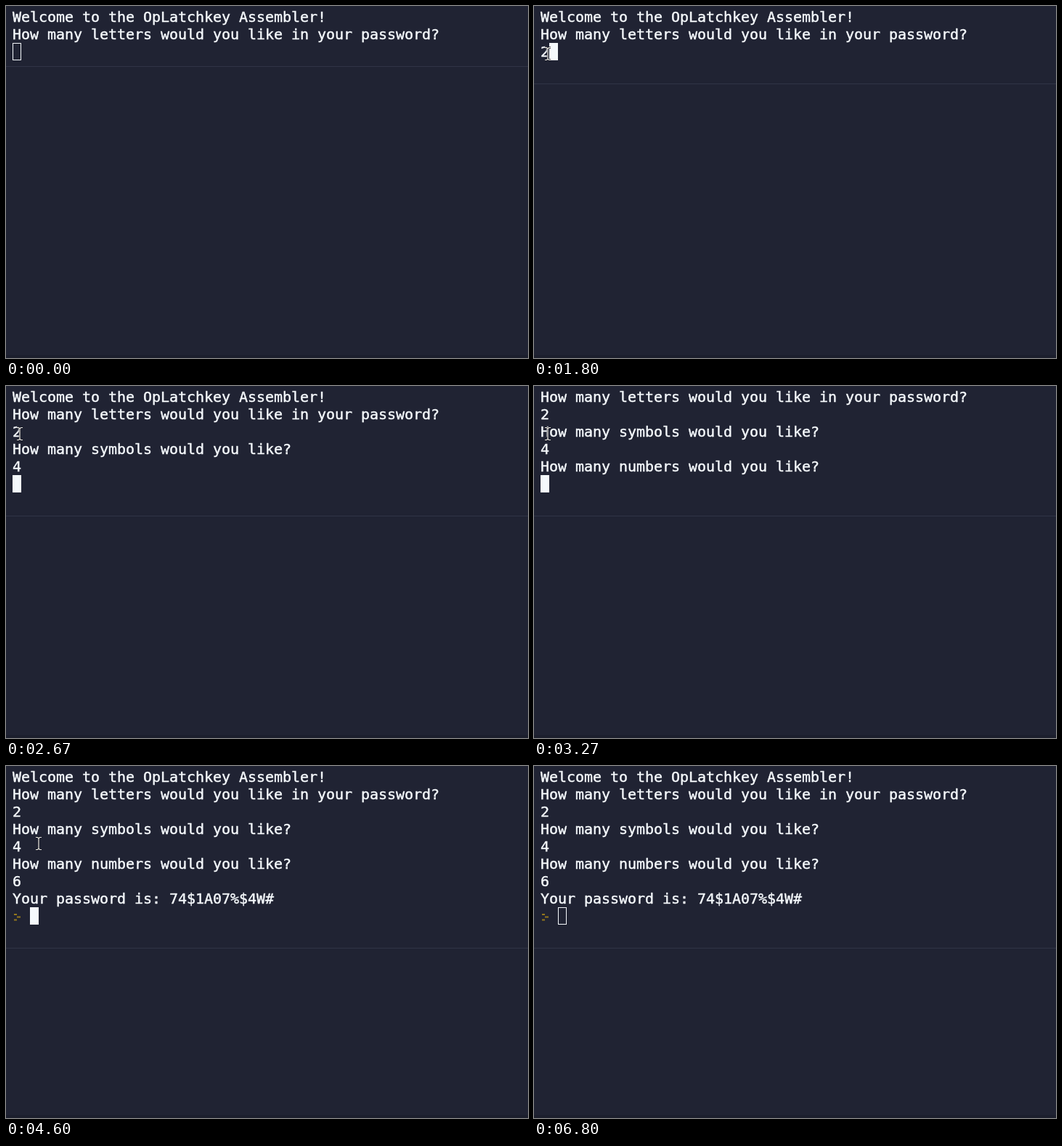
Animation, 719 px wide and 486 px high, one loop 6.94 s. Source, as an HTML page:

```html
<!DOCTYPE html>
<html lang="en">
<head>
<meta charset="utf-8">
<title>Password terminal</title>
<style>
  html, body { margin: 0; width: 100%; height: 100%; overflow: hidden; background: #202333; }
  svg { display: block; width: 719px; height: 486px; }
  text {
    font: 20px "DejaVu Sans Mono", monospace; letter-spacing: -.04px; white-space: pre;
    fill: #f5f9fc; stroke: #f5f9fc; stroke-width: .45px;
  }
</style>
</head>
<body>
<svg viewBox="0 0 719 486">
  <defs>
    <path id="beam" d="M-4-8.5h2.5L0-7 1.5-8.5H4M0-7V7M-4 8.5h2.5L0 7 1.5 8.5H4"/>
  </defs>
  <rect width="719" height="486" fill="#202333"/>
  <rect y="482" width="719" height="4" fill="#1c1f2d"/>
  <rect id="divider" width="719" height="1" fill="#303446"/>
  <g id="lines"></g>
  <path id="prompt" d="M11 205h4M15 208.5h5M11 212.5h4" stroke="#94781c" stroke-width="2.2"/>
  <rect id="caret" width="11" height="23" stroke="#f5f9fc"/>
  <g id="pointer" fill="none">
    <use href="#beam" stroke="#161824" stroke-width="2.4"/>
    <use href="#beam" stroke="#f4f1e8" stroke-width="1.2"/>
  </g>
</svg>
<script>
const LOOP = 6940, ROW = 24, COLUMN = 12, LEFT = 9, TOP = 3;
const FOCUS = 1070, FIRST_KEY = 1800, BLUR = 6800;
const $ = id => document.getElementById(id);
const show = (el, on) => el.setAttribute("visibility", on ? "visible" : "hidden");

// The panel grows `lag` ms after a print; until then the text is scrolled by a row.
const prints = [
  { at: 0, lag: 0, text: "Welcome to the OpLatchkey Assembler!\nHow many letters would you like in your password?\n" },
  { at: FIRST_KEY, lag: 0, text: "2" },
  { at: 2000, lag: 70, text: "\n" },
  { at: 2400, lag: 130, text: "How many symbols would you like?\n" },
  { at: 2670, lag: 0, text: "4\n" },
  { at: 3270, lag: 60, text: "How many numbers would you like?\n" },
  { at: 3470, lag: 60, text: "6\n" },
  { at: 3530, lag: 0, text: "Your password is: 74$1A07%$4W#\n  " }
];

// Bézier glides of the pointer, timed in ticks of 1/15 s
const glides = [
  { from: 1, to: 2, path: [[714, 478], [120, 110]] },
  { from: 4, to: 13, path: [[120, 110], [145, 125], [-47, 62], [19, 66]] },
  { from: 66, to: 77, path: [[19, 66], [40, 110], [110, 185], [139, 213]] },
  { from: 77, to: 88, path: [[139, 213], [357, 150], [420, 259], [86, 410]] },
  { from: 88, to: 92, path: [[86, 410], [96, 430], [88, 455], [58, 500]] }
];

const transcript = prints.map(p => p.text).join("").split("\n");
const lineEls = transcript.map(content => {
  const el = document.createElementNS("http://www.w3.org/2000/svg", "text");
  el.setAttribute("x", LEFT);
  return $("lines").appendChild(el);
});

function drawTerminal(t) {
  const done = prints.filter(p => p.at <= t);
  const last = done.at(-1);
  const lagging = t < last.at + last.lag;
  const lines = done.map(p => p.text).join("").split("\n");
  const spare = t >= FIRST_KEY && !lagging ? 1 : 0;
  const rowTop = i => TOP + ROW * (i - lagging);

  lineEls.forEach((el, i) => {
    el.textContent = lines[i] ?? "";
    el.setAttribute("y", rowTop(i) + 19);
    show(el, rowTop(i) > 0);
  });
  $("divider").setAttribute("y", 11 + ROW * (lines.length + spare));

  const caret = $("caret");
  caret.setAttribute("x", LEFT + .5 + COLUMN * lines.at(-1).length);
  caret.setAttribute("y", rowTop(lines.length - 1) + .5);
  caret.setAttribute("fill", t >= FOCUS && t < BLUR ? "#f5f9fc" : "none");
  show($("prompt"), done.length === prints.length);
}

const mix = (a, b, p) => a.map((v, i) => v + (b[i] - v) * p);

function bezier(points, p) {
  if (points.length === 1) return points[0];
  return bezier(points.slice(1).map((b, i) => mix(points[i], b, p)), p);
}

function drawPointer(t) {
  const tick = Math.floor((Math.floor(t / 10) + .5) * .15);
  const glide = glides.findLast(g => g.from <= tick);
  const visible = Boolean(glide) && tick < glides.at(-1).to;
  show($("pointer"), visible);
  if (!visible) return;
  const p = Math.min(1, (tick - glide.from) / (glide.to - glide.from));
  const [x, y] = bezier(glide.path, p).map(Math.round);
  $("pointer").setAttribute("transform", `translate(${x} ${y})`);
}

const start = performance.now();
function frame() {
  const t = (performance.now() - start) % LOOP;
  drawTerminal(t);
  drawPointer(t);
  requestAnimationFrame(frame);
}
frame();
</script>
</body>
</html>
```
